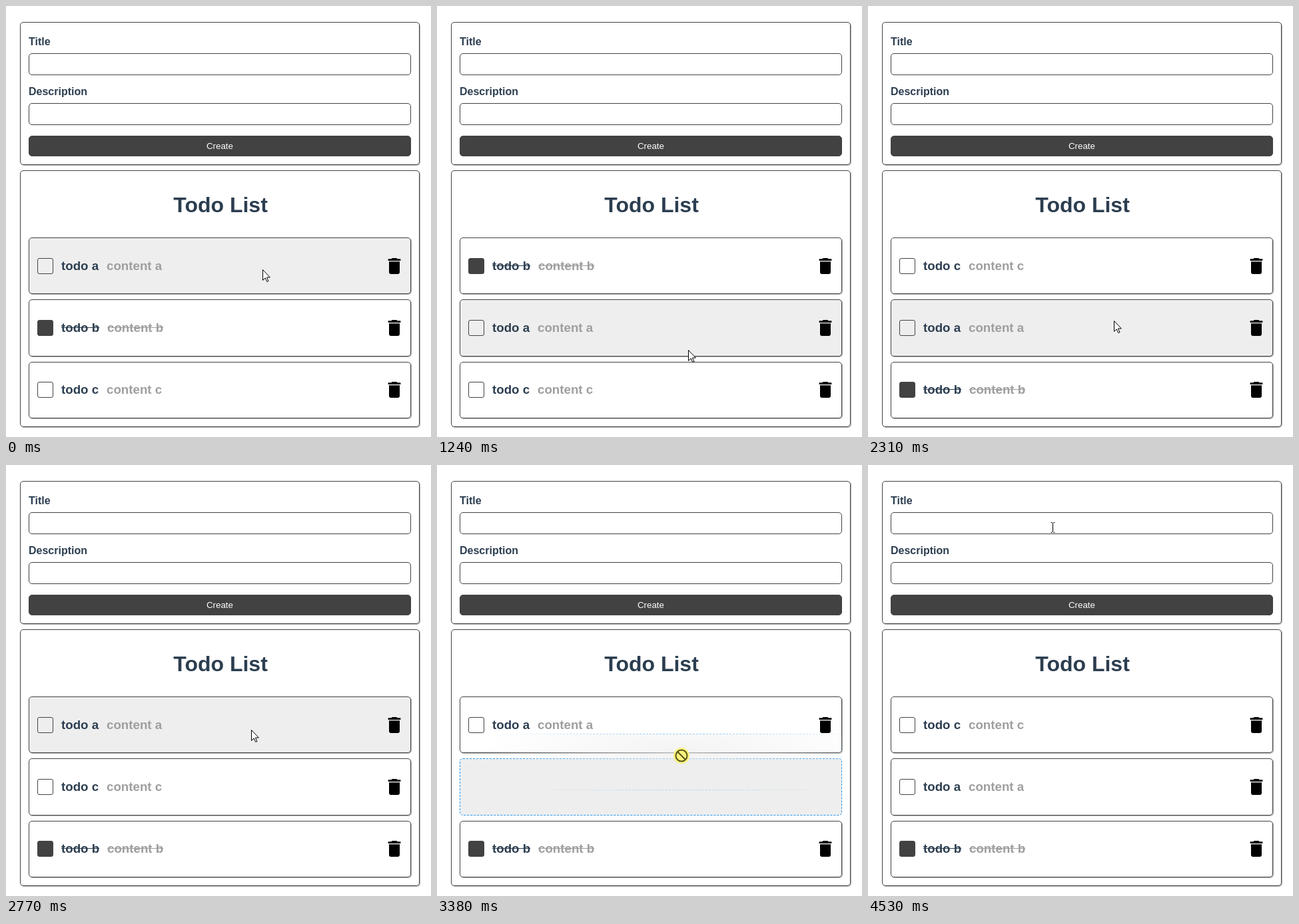
These frames come from a looping animation (638 px wide and 648 px high, 4.8 s). An HTML page:

```html
<!DOCTYPE html>
<html lang="en">
<head>
<meta charset="utf-8">
<title>Todo List</title>
<style>
  html, body { margin: 0; width: 100%; height: 100%; overflow: hidden; background: #fff; }
  body { position: relative; font: bold 16px "Liberation Sans", Arial, sans-serif; color: #2c3e50; }
  div, span, svg { position: absolute; box-sizing: border-box; white-space: nowrap; }
  .box { left: 34px; width: 574px; border: 1px solid #424242; border-radius: 5px; }
  .panel { left: 21px; width: 600px; }
  .panel, .slot { box-shadow: 1px 1px 1px #b0b0b0; }
  .input { height: 33px; }
  .hover { background: #eee; }
  .held { background: #eee; border: 1px dashed #2196f3; box-shadow: none; }
  .target { border: 1px dashed #ef2350; box-shadow: none; }
  .button { top: 195px; height: 31px; background: #424242; color: #fff; font: 13.333px/29px "Liberation Sans", Arial, sans-serif; text-align: center; }
  .label { left: 34px; }
  .heading { left: 35px; top: 281px; width: 574px; font-size: 32px; text-align: center; }
  .item { left: 0; width: 638px; height: 24px; font-size: 18.72px; }
  .item span { top: 1px; }
  .check { left: 47px; width: 24px; height: 24px; border: 1px solid #424242; border-radius: 3px; }
  .note { color: #9e9e9e; }
  .done span { text-decoration: line-through; }
  .done .check { background: #424242; }
  .bin { left: 567px; top: -4px; width: 32px; height: 32px; }
  #layer { left: 0; top: 0; width: 638px; height: 648px; }
</style>
</head>
<body>
<div class="box panel" style="top:24px;height:215px"></div>
<div class="box panel" style="top:247px;height:386px"></div>
<span class="label" style="top:45px">Title</span>
<div class="box input" style="top:71px"></div>
<span class="label" style="top:120px">Description</span>
<div class="box input" style="top:146px"></div>
<div class="box button">Create</div>
<div class="heading">Todo List</div>
<div id="list"></div>
<svg id="layer" viewBox="0 0 638 648">
  <defs>
    <radialGradient id="fadeGrey" gradientUnits="userSpaceOnUse" cx="0" cy="0" r="1" gradientTransform="scale(300 80)">
      <stop offset="0" stop-color="#eee" stop-opacity=".7"/>
      <stop offset="1" stop-color="#eee" stop-opacity="0"/>
    </radialGradient>
    <radialGradient id="fadeBlue" gradientUnits="userSpaceOnUse" cx="0" cy="0" r="1" gradientTransform="scale(300 80)">
      <stop offset="0" stop-color="#2196f3" stop-opacity=".8"/>
      <stop offset="1" stop-color="#2196f3" stop-opacity="0"/>
    </radialGradient>
  </defs>
  <g id="pointer">
    <rect id="ghost" rx="4.5" width="573" height="84" fill="url(#fadeGrey)" stroke="url(#fadeBlue)" stroke-dasharray="3 2"/>
    <g id="blocked" fill="none" stroke="#55521a" stroke-width="2">
      <circle r="12" fill="#f9f37c" stroke="none"/>
      <circle r="8.5"/>
      <path d="M-6-6 6 6"/>
    </g>
    <path id="arrow" d="M.5.5V16.4L4.2 12.9 6.8 18.5 9 17.5 6.4 12H11.4Z" fill="#fff" stroke="#000"/>
    <path id="beam" d="M-2.5-7.5H-.5M1.5-7.5H3.5M.5-7V7M-2.5 7.5H-.5M1.5 7.5H3.5" fill="none" stroke="#000"/>
  </g>
</svg>
<script>
const LOOP = 4800, STEP = 50;
const SLOT_TOP = 348, SLOT_PITCH = 93.3, SLOT_HEIGHT = 85.3;
const $ = id => document.getElementById(id);
const slotTop = i => Math.round(SLOT_TOP + i * SLOT_PITCH);
const slotAt = y => [0, 1, 2].find(i => y >= slotTop(i) && y < slotTop(i) + SLOT_HEIGHT);

function add(className, html = "") {
  const el = document.createElement("div");
  el.className = className;
  el.innerHTML = html;
  document.body.insertBefore(el, $("layer"));
  return el;
}

const slots = [0, 1, 2].map(i => {
  const el = add("box slot");
  el.style.top = slotTop(i) + "px";
  el.style.height = Math.round(SLOT_TOP + i * SLOT_PITCH + SLOT_HEIGHT) - slotTop(i) + "px";
  return el;
});

const items = ["a", "b", "c"].map(name => {
  const done = name === "b";
  return add(done ? "item done" : "item", `
    <div class="check"></div>
    <span style="left:83px">todo ${name}</span>
    <span class="note" style="left:${done ? 152 : 151}px">content ${name}</span>
    <svg class="bin" viewBox="0 0 24 24"><path d="M6 19c0 1.1.9 2 2 2h8c1.1 0 2-.9 2-2V7H6zM19 4h-3.5l-1-1h-5l-1 1H5v2h14z"/></svg>`);
});

// Pointer gestures; each one eases from where the last ended
const moves = [
  { start: 270, end: 320, x: 378, y: 389 },
  { start: 500, end: 950, x: 380, y: 486, drag: true },
  { start: 1090, end: 1390, x: 374, y: 547 },
  { start: 1450, end: 1735, x: 370, y: 393, drag: true },
  { start: 1960, end: 2360, x: 369, y: 477 },
  { start: 2420, end: 2720, x: 368, y: 398, drag: true },
  { start: 2800, end: 3150, x: 367, y: 474 },
  { start: 3200, end: 3500, x: 366, y: 400, drag: true },
  { start: 3590, end: 3790, x: 366, y: 474 },
  { start: 3870, end: 4370, x: 277, y: 97 },
  { start: 4430, end: 4530, x: 277, y: 94 }
];

const ease = k => k * k * (3 - 2 * k);
const mix = (a, b, k) => Math.round(a + (b - a) * k);

// Replays the gestures up to time t, moving in short steps
function stateAt(t) {
  const order = [0, 1, 2];
  let pos = { x: 385, y: 396 }, grab = null;
  for (const m of moves) {
    if (t < m.start + STEP) break;
    if (t >= m.end) {
      if (m.drag) {
        const from = slotAt(pos.y), to = slotAt(m.y);
        [order[from], order[to]] = [order[to], order[from]];
      }
      pos = m;
    } else {
      const passed = Math.floor((t - m.start) / STEP) * STEP;
      const k = ease(passed / (m.end - m.start));
      if (m.drag) grab = pos;
      pos = { x: mix(pos.x, m.x, k), y: mix(pos.y, m.y, k) };
    }
  }
  return { order, grab, x: pos.x, y: pos.y };
}

function show(el, on) { el.style.visibility = on ? "visible" : "hidden"; }

function render(t) {
  const { order, grab, x, y } = stateAt(t);
  const over = slotAt(y), held = grab ? slotAt(grab.y) : -1;
  slots.forEach((slot, i) => {
    const look = i === held ? "held" : i !== over ? "" : grab ? "target" : "hover";
    slot.className = "box slot " + look;
    const item = items[order[i]];
    item.style.top = slotTop(i) + (i < 2 ? 31 : 30) + "px";
    show(item, i !== held);
  });

  const typing = !grab && ((y >= 71 && y < 104) || (y >= 146 && y < 179));
  $("pointer").setAttribute("transform", `translate(${x} ${y})`);
  show($("ghost"), grab);
  show($("blocked"), grab);
  show($("beam"), typing);
  show($("arrow"), !grab && !typing);
  if (grab) {
    $("ghost").setAttribute("x", 34.5 - grab.x);
    $("ghost").setAttribute("y", slotTop(held) + .5 - grab.y);
  }
}

const began = performance.now();
function tick() {
  render((performance.now() - began) % LOOP);
  requestAnimationFrame(tick);
}
tick();
</script>
</body>
</html>
```
